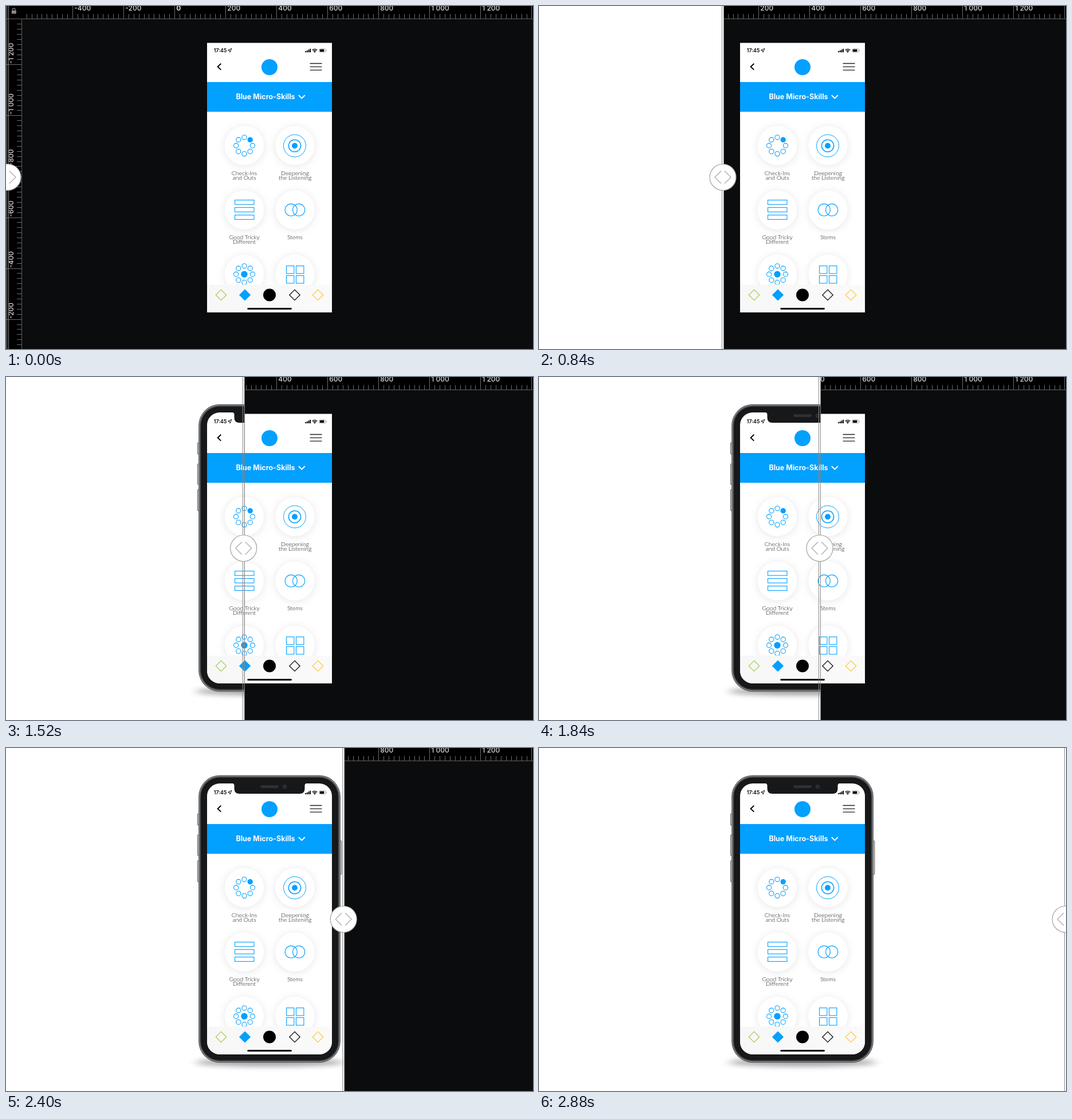
Recreate the animation shown at these times as an HTML page. Size 920 px wide and 600 px high, loop 5640 ms.

```html
<!DOCTYPE html>
<html lang="en">
<head>
<meta charset="utf-8">
<title>Before and after slider</title>
<style>
  html, body { margin: 0; width: 100%; height: 100%; overflow: hidden; background: #fff; }
  svg { display: block; }
  .ruler text { font: 500 12px Inter, Arial, sans-serif; fill: #dcdcdc; }
  .ruler path { stroke: #6c6c6c; fill: none; }
  .label { font: 300 10.4px Lato, sans-serif; fill: #111; text-anchor: middle; }
  .title { font: 700 12.5px Inter, sans-serif; fill: #fff; text-anchor: middle; }
  .clock { font: 600 8.8px Inter, sans-serif; }
  .line { fill: none; stroke: #02a0ff; stroke-width: 1.1; }
  .solid { fill: #02a0ff; }
</style>
</head>
<body>
<svg width="920" height="600" viewBox="0 0 920 600">
  <defs>
    <clipPath id="reveal"><rect id="revealBox" width="0" height="600"/></clipPath>
    <clipPath id="glass"><rect x="351" y="62" width="218" height="474" rx="22"/></clipPath>
    <clipPath id="list"><rect x="351" y="185" width="218" height="302.5"/></clipPath>
    <filter id="soft" x="-50%" y="-50%" width="200%" height="200%">
      <feDropShadow dx="0" dy="1.5" stdDeviation="7" flood-color="#000" flood-opacity=".1"/>
    </filter>
    <filter id="blur" x="-20%" y="-200%" width="140%" height="500%">
      <feGaussianBlur stdDeviation="8 5"/>
    </filter>
    <linearGradient id="tabs">
      <stop stop-color="#f7f7f7"/><stop offset="1" stop-color="#fafafa"/>
    </linearGradient>

    <g id="screen">
      <text class="clock" x="362.8" y="81">17:45</text>
      <path d="M394 74.2 387.4 77.5 390.6 77.8 391 81Z" fill="none" stroke="#000" stroke-width=".9"/>
      <path d="M522 79h1.9v2h-1.9zM524.8 77.8h1.9v3.2h-1.9zM527.5 76.3h1.9v4.7h-1.9zM530.2 74.8h1.9v6.2h-1.9z"/>
      <path d="M534.5 77.2q4.4-3.6 8.8 0M536.3 79q2.6-2.1 5.2 0" fill="none" stroke="#000" stroke-width="1.4"/>
      <circle cx="538.9" cy="80.4" r="1.1"/>
      <rect x="546.8" y="74.8" width="11.4" height="6.2" rx="1.7" fill="none" stroke="#888" stroke-width=".7"/>
      <rect x="547.8" y="75.8" width="7.6" height="4.2" rx=".8"/>
      <path d="M559.3 76.8v2.2" stroke="#888" stroke-width=".8"/>
      <path d="M375.3 100.8 369.6 106.2 375.3 111.6" fill="none" stroke="#000" stroke-width="1.9"/>
      <circle class="solid" cx="460" cy="107" r="14"/>
      <path d="M530.5 100.5h21M530.5 106.3h21M530.5 112.2h21" stroke="#222" stroke-width="1.3"/>

      <rect class="solid" x="351" y="133" width="218" height="52"/>
      <text class="title" x="453" y="163.3">Blue Micro-Skills</text>
      <path d="M510.8 156 516.3 161.4 521.8 156" fill="none" stroke="#fff" stroke-width="1.9"/>

      <g id="cards" clip-path="url(#list)"></g>

      <rect x="351" y="487.5" width="218" height="48.5" fill="url(#tabs)"/>
      <g id="tabIcons" stroke-width="1.3"></g>
      <circle cx="460" cy="505.5" r="11"/>
      <rect x="421.3" y="528" width="77.6" height="3" rx="1.5"/>
    </g>
  </defs>

  <rect width="920" height="600" fill="#0b0c0e"/>
  <g class="ruler">
    <path d="M0 0H920V22H28V600H0Z" style="fill:#000;stroke:none"/>
    <path id="ticks"/>
    <path d="M0 22.5H920M27.5 22V600" style="stroke:#606060"/>
    <g id="numbers"></g>
    <rect x="9.8" y="8" width="8" height="5.6" rx=".8" fill="#8c8c8c"/>
    <path d="M11.5 8V6.5a2.3 2.3 0 0 1 4.6 0V8" style="stroke:#8c8c8c;stroke-width:1.2"/>
  </g>
  <rect x="351" y="64.5" width="218" height="471" fill="#fff"/>
  <use href="#screen"/>

  <g clip-path="url(#reveal)">
    <rect width="920" height="600" fill="#fff"/>
    <ellipse cx="460" cy="550" rx="130" ry="7" opacity=".36" filter="url(#blur)"/>
    <g fill="#e2e3e4" stroke="#3b3c3e" stroke-width=".9">
      <rect x="334.4" y="115" width="3" height="20" rx="1"/>
      <rect x="334.4" y="152" width="3" height="36" rx="1"/>
      <rect x="334.4" y="197" width="3" height="37" rx="1"/>
      <rect x="582.8" y="162.5" width="3" height="58.5" rx="1"/>
    </g>
    <g id="frame"></g>
    <g clip-path="url(#glass)">
      <rect x="351" y="62" width="218" height="474" fill="#fff"/>
      <use href="#screen"/>
    </g>
    <path d="M394.5 61.5q4 .5 4 4.5v5q0 9 9 9h105q9 0 9-9v-5q0-4 4-4.5z" fill="#17181a"/>
    <rect x="444" y="65.3" width="32" height="4.6" rx="2.3" fill="#303134"/>
    <circle cx="486.5" cy="67.6" r="3.7" fill="#303236"/>
    <circle cx="486.5" cy="67.6" r="1.7" fill="#1b2230"/>
  </g>

  <g id="slider">
    <path d="M-1.5 0V600M1.5 0V600" stroke="#8a8a8a"/>
    <circle cy="299.5" r="23" fill="#fff" stroke="#a2a2a2" stroke-width="1.2"/>
    <path d="M-3 288.5-14 299.5-3 310.5M3 288.5 14 299.5 3 310.5" fill="none" stroke="#aaa" stroke-width="1.2"/>
  </g>
</svg>

<script>
const el = id => document.getElementById(id);
const circle = (x, y, r, cls = 'line', extra = '') =>
  `<circle cx="${x}" cy="${y}" r="${r}" class="${cls}" ${extra}/>`;
const box = (x, y, w, h) => `<rect x="${x}" y="${y}" width="${w}" height="${h}" class="line"/>`;

// Rulers: a labelled tick every 200 units, a short one every 20
const STEP = 89.06, ORIGIN_X = 294, ORIGIN_Y = 636.7;
const grouped = n => String(n).replace(/(\d)(\d{3})$/, '$1 $2');
let ticks = '', numbers = '';
for (let i = -29; i <= 70; i++) {
  const x = Math.round(ORIGIN_X + i * STEP / 10) + .5;
  ticks += `M${x} ${i % 10 ? 14 : 0}V22`;
  if (i % 10 === 0)
    numbers += `<text x="${x + 2.8}" y="8.3" ${i ? '' : 'style="font-weight:700"'}>${grouped(i * 20)}</text>`;
}
for (let i = -68; i < -4; i++) {
  const y = Math.round(ORIGIN_Y + i * STEP / 10) + .5;
  ticks += `M${i % 10 ? 19 : 0} ${y}H27`;
  if (i % 10 === 0)
    numbers += `<text transform="translate(13.3 ${y - 1.5}) rotate(-90)">${grouped(i * 20)}</text>`;
}
el('ticks').setAttribute('d', ticks);
el('numbers').innerHTML = numbers;

// Skill cards
const ring = (x, y, filled) => Array.from({ length: 8 }, (_, i) => {
  const a = (i - 2) * Math.PI / 4;
  const [cx, cy] = [x + 14.4 * Math.cos(a), y + 14.4 * Math.sin(a)];
  return i === filled ? circle(cx, cy, 4.7, 'solid') : circle(cx, cy, 4.1);
}).join('');

const cards = [
  { lines: ['Check-Ins', 'and Outs'], icon: (x, y) => ring(x, y, 1) },
  { lines: ['Deepening', 'the Listening'], icon: (x, y) =>
      circle(x - .5, y + .3, 19.5, 'line', 'style="stroke-width:1"') +
      circle(x - .5, y + .3, 10.6, 'line', 'style="stroke-width:1.5"') +
      circle(x - .5, y + .3, 5, 'solid') },
  { lines: ['Good Tricky', 'Different'], icon: (x, y) =>
      [-17.2, -4.2, 9].map(dy => box(x - 16.5, y + dy, 33.5, 7.7)).join('') },
  { lines: ['Stems'], icon: (x, y) => circle(x - 6.8, y, 10.6) + circle(x + 6.6, y, 10.6) },
  { lines: [], icon: (x, y) => ring(x, y) + circle(x, y, 5.7, 'solid') },
  { lines: [], icon: (x, y) => [-15, 2].map(dx =>
      [-14.6, 2.4].map(dy => box(x + dx, y + dy, 13.4, 13.4)).join('')).join('') }
];
el('cards').innerHTML = cards.map(({ lines, icon }, i) => {
  const x = i % 2 ? 504.5 : 416, y = 244.2 + 112.5 * Math.floor(i / 2);
  return circle(x, y, 34, '', 'fill="#fff" filter="url(#soft)"') + icon(x, y) +
    lines.map((s, n) => `<text class="label" x="${x}" y="${y + 51.3 + 8.2 * n}">${s}</text>`).join('');
}).join('');

// Tab bar diamonds: centre, outline, fill
el('tabIcons').innerHTML = [
  [375.5, '#a8cf58', 'none'], [417, '#02a0ff', '#02a0ff'], [504, '#111', 'none'], [544.5, '#fdcb45', 'none']
].map(([x, stroke, fill]) =>
  `<path d="M${x} 496.3l9.2 9.2-9.2 9.2-9.2-9.2z" stroke="${stroke}" fill="${fill}"/>`).join('');

// Phone shell, nested from the outside in: inset, colour
el('frame').innerHTML = [
  [0, '#3a3b3d'], [1, '#a0a2a4'], [2, '#4a4b4e'], [3.4, '#2b2c2f'], [5, '#0c0d0e'], [6, '#17181a']
].map(([d, color]) =>
  `<rect x="${336.2 + d}" y="${47.8 + d}" width="${247.6 - 2 * d}" height="${502.4 - 2 * d}" rx="${37 - d}" fill="${color}"/>`).join('');

// Slider keyframes: time in ms, position
const LOOP = 5640, FRAME = 20;
const keys = [[510, 3], [840, 321], [2580, 597.5], [2870, 919]];
const ease = u => u * u * (3 - 2 * u);

function sliderAt(t) {
  if (t <= keys[0][0]) return keys[0][1];
  for (let i = 1; i < keys.length; i++) {
    const [t0, x0] = keys[i - 1], [t1, x1] = keys[i];
    if (t < t1) return x0 + (x1 - x0) * ease((t - t0) / (t1 - t0));
  }
  return keys[keys.length - 1][1];
}

function draw() {
  const t = Math.floor(performance.now() % LOOP / FRAME) * FRAME;
  const x = sliderAt(t);
  // The second picture stays hidden until the slider leaves its rest position
  el('revealBox').setAttribute('width', t > keys[0][0] ? x + 1.5 : 0);
  el('slider').setAttribute('transform', `translate(${x.toFixed(2)} 0)`);
  requestAnimationFrame(draw);
}
draw();
</script>
</body>
</html>
```
